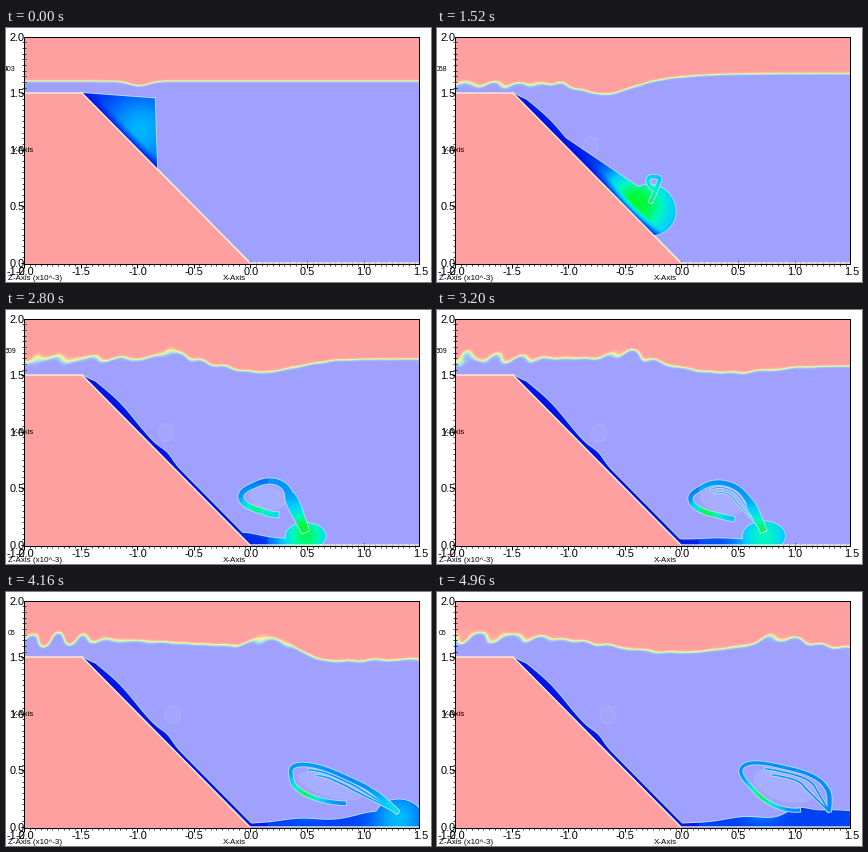
Write a matplotlib script that moves like this. It is 425 px wide and 254 px high and loops after 5000 ms.

```python
import numpy as np
import matplotlib.pyplot as plt
from matplotlib.animation import FuncAnimation
from matplotlib.colors import LinearSegmentedColormap
from matplotlib.patches import Ellipse, PathPatch, Polygon
from matplotlib.path import Path

W, H, FRAMES, STEP = 425, 254, 125, 40
LEFT, RIGHT, TOP, BOTTOM = 18, 413, 9, 236
FLOOR, UNIT = 235, 113.2
PINK, WATER, PALE = "#ffa0a0", "#a0a0ff", "#bcd8ff"
SLIDE_MAP = LinearSegmentedColormap.from_list(
    "slide", ["#0010e8", "#0070ff", "#00d0ff", "#00f8c0", "#00fa38"])
MIX_MAP = LinearSegmentedColormap.from_list(
    "mix", [PINK, "#ffc89c", "#fdf2a4", "#c4fab4", "#a4e4e8", WATER])
rng = np.random.default_rng(4)


def keyed(t, times, values):
    return float(np.interp(t, times, values))


def ramp(t, start, length):
    return float(np.clip((t - start) / length, 0, 1))


def bell(x, centre, width):
    return np.exp(-((x - centre) / width) ** 2)


def slope_y(x):
    return 65 + (x - 76) * 170 / 168


def on_slope(s, n):
    """Point s along the slope and n above it."""
    return np.column_stack([76 + .703 * s + .711 * n, 65 + .711 * s - .703 * n])


def turn(x, y, angle):
    c, s = np.cos(angle), np.sin(angle)
    return np.column_stack([x * c - y * s, x * s + y * c])


def ribbon(line, width):
    d = np.gradient(line, axis=0)
    d /= np.hypot(*d.T)[:, None] + 1e-6
    off = np.column_stack([-d[:, 1], d[:, 0]]) * np.reshape(width, (-1, 1)) / 2
    return np.vstack([line + off, (line - off)[::-1]])


def joined(polys):
    return Path.make_compound_path(
        *[Path(np.vstack([p, p[:1]]), closed=True) for p in polys])


# --- free surface ---------------------------------------------------------

def crest_x(t):
    return 110 + 12 * max(t - .6, 0) ** 2


def surface(x, t):
    left = keyed(t, [0, 1.5, 2.8, 4.2, 5], [53, 56, 48.5, 47, 43])
    right = keyed(t, [0, 1.6, 2.8, 3.6, 4.16, 5], [53, 45, 49, 63, 67, 54])
    crest = crest_x(t)
    step = 1 / (1 + np.exp(-(x - max(225, crest + 38))
                           / keyed(t, [1.5, 3.5], [26, 9])))
    trough = keyed(t, [0, .8, 1.5, 2.8, 3.6], [4.5, 12, 11, 13, 0])
    return (left + (right - left) * step
            + trough * bell(x, 133 + 15.5 * t * t, 14 + 13 * t)
            + 11 * bell(t, .8, .4) * bell(x, 97, 9)
            + 17 * ramp(t, 3.7, 1.25) * bell(x, 240, 95)
            - keyed(t, [1.2, 2.8, 3.6, 4.2, 5], [0, 8, 9, 8, 4]) * bell(x, crest, 17))


MODES = [(2 * np.pi / rng.uniform(11, 36), rng.uniform(-.22, .22),
          rng.uniform(-4, 4), rng.uniform(0, 6.3)) for _ in range(7)]
band_x, band_y = np.meshgrid(np.arange(LEFT, RIGHT) + .5, np.arange(TOP, 84) + .5)


def mixing(t):
    """Air to water, 0 to 1, stirred most on the shelf and at the crest."""
    depth = band_y - surface(band_x, t)
    rough = ramp(t, .6, 2.4) * (
        .2 + 1.7 * np.exp(-(band_x - 18) / 32) + .8 * bell(band_x, 62, 36)
        + .7 * bell(band_x, crest_x(t), 24)) * bell(depth, 0, 13)
    rough *= np.clip((150 + 75 * t - band_x) / 60, .05, 1)
    stir = sum(np.sin(k * band_x + q * band_y + w * t + p) for k, q, w, p in MODES)
    return 1 / (1 + np.exp(-(depth + 1.5 * rough * stir) / (.55 + .6 * rough)))


# --- slide ----------------------------------------------------------------

def head(t):
    x = 135 + 69 * (np.hypot(t, .45) - .45)
    times = [0, .8, 1.5, 2.8, 5]
    return (x, min(slope_y(x) - 22, 226),
            keyed(t, times, [2, 34, 26, 20, 26]), keyed(t, times, [2, 16, 25, 13, 22]))


def head_shape(t):
    x, y, rx, ry = head(t)
    a = np.linspace(0, 2 * np.pi, 50)
    lean = np.pi / 4 * (1 - ramp(t, 1.5, .8))
    return turn(rx * np.cos(a), ry * np.sin(a), lean) + [x, y]


def wedge(t):
    times = [0, .8, 1.52, 2.4]
    back = keyed(t, times, [0, 0, 40, 200])
    top = keyed(t, times, [55, 105, 160, 220])
    height = keyed(t, times, [48, 26, 24, 4])
    foot = keyed(t, times, [108, 140, 200, 240])
    return on_slope(np.array([back, top, foot]), np.array([0, height, -1]))


def tail(t):
    s = np.linspace(0, 246, 90)
    x = 76 + .703 * s
    thick = (3.2 + 4 * bell(x, 108, 24) + 2.6 * bell(x, 157, 8)) * np.clip(s / 14, 0, 1)
    thick *= np.clip((120 + 65 * t - x) / 18, 0, 1) * min(1, .35 + .45 * t)
    return np.vstack([on_slope(s, thick), on_slope(s[::-1], 0 * s - 2)])


def floor_sheet(t):
    x = np.linspace(232, max(head(t)[0], 240), 80)
    h = (3 + .075 * (x - 240) + 2.2 * np.sin(x / 14 - 1.5 * t) * np.clip((x - 250) / 60, 0, 1)
         + 11 * bell(x, 235, 25) * bell(t, 2.6, .5)
         + 8 * ramp(t, 4.1, .8) * bell(x, 360, 16))
    top = np.column_stack([x, FLOOR - h * ramp(t, 2, .5)])
    return np.vstack([top, [[x[-1], 242], [232, 242]]])


def plume_box(t):
    times = [1.1, 1.52, 2.8, 3.6, 4.16, 4.96]
    return (keyed(t, times, [180, 217, 262, 310, 324, 347]),
            keyed(t, times, [128, 154, 188, 195, 194, 194]),
            keyed(t, times, [1, 6, 25, 38, 45, 43]),
            keyed(t, times, [1, 6, 16, 17, 15, 20]))


def hook(t, scale, start):
    """Hook from its inner end over the top and down into the head."""
    cx, cy, a, b = plume_box(t)
    angle = np.radians(np.linspace(start, 330, 60))
    r = scale * (1 + .1 * np.sin(3 * angle + 2 * t))
    arc = turn(a * r * np.cos(angle), b * r * np.sin(angle), .3 * ramp(t, 2, 1.4))
    arc += [cx, cy]
    x, y, rx, ry = head(t)
    goal = np.array([min(x, 392), y - .3 * ry])
    u = np.linspace(0, 1, 25)[1:, None]
    bend = arc[-1] + .5 * (arc[-1] - arc[-6])
    leg = (1 - u) ** 2 * arc[-1] + 2 * u * (1 - u) * bend + u * u * goal
    return np.vstack([arc, leg])


gx, gy = np.meshgrid(np.arange(LEFT, RIGHT) + .5, np.arange(TOP, BOTTOM) + .5)
lift = np.clip((slope_y(gx) - gy) * .703, 0, None)


def heat(t):
    def spot(x, y, r):
        return np.exp(-((gx - x) ** 2 + (gy - y) ** 2) / (r * r))

    x, y, _, _ = head(t)
    front = keyed(t, [0, .8, 1.5, 2.8, 3.6, 5], [.4, .72, .52, .8, .45, .12])
    v = .03 + front * spot(x, y, keyed(t, [0, 1.5, 2.8], [42, 40, 26]))
    v += .62 * bell(t, 1.6, .5) * spot(x - 22, y - 10, 34)
    tip_x, tip_y = hook(t, 1, 60)[12]
    v += .6 * ramp(t, 1.7, .8) * spot(tip_x, tip_y, 17)
    v += .1 * ramp(t, 2.2, .6) * (gx > 262)
    return v * np.where(gx < 232, np.clip(.1 + lift / 9, 0, 1), 1)


# --- scene ----------------------------------------------------------------

fig = plt.figure(figsize=(W / 100, H / 100), dpi=100, facecolor="white")
ax = fig.add_axes([LEFT / W, 1 - BOTTOM / H, (RIGHT - LEFT) / W, (BOTTOM - TOP) / H])
ax.set_facecolor(WATER)


def px(n):
    return n * .72


def field(cmap, shape, bottom, z):
    return ax.imshow(np.zeros(shape), cmap=cmap, vmin=0, vmax=1, aspect="auto",
                     extent=(LEFT, RIGHT, bottom, TOP), interpolation="nearest", zorder=z)


def slide_layer(z):
    edge = ax.add_patch(PathPatch(Path([[0, 0]]), fc="none", ec=PALE, lw=px(1.8), zorder=z))
    return edge, field(SLIDE_MAP, gx.shape, BOTTOM, z + .1)


air = field(MIX_MAP, band_x.shape, 84, 1)
eddy = ax.add_patch(Ellipse((0, 0), 15, 18, fc="#a8a8ff", ec="#b0b4ff", lw=px(1), zorder=2))
haze = ax.add_patch(Ellipse((0, 0), 1, 1, fc="#acb4ff", ec="none", zorder=2))
body_layer, plume_layer = slide_layer(3), slide_layer(3.3)

ax.add_patch(Polygon([[10, 65], [76, 65], [245, 236], [245, 240], [10, 240]],
                     fc=PINK, ec="none", zorder=4))
ax.plot([10, 76, 244, 420], [65, 65, FLOOR, FLOOR], color="#fff6d2", lw=px(1.3), zorder=5)
ax.set_xlim(LEFT, RIGHT)
ax.set_ylim(BOTTOM, TOP)

ax.set_xticks(LEFT + UNIT * np.arange(7) / 2)
ax.set_xticks(LEFT + UNIT * np.arange(70) / 20, minor=True)
ax.set_yticks(FLOOR - UNIT * np.arange(4) / 2)
ax.set_yticks(FLOOR - UNIT * np.arange(40) / 20, minor=True)
ax.tick_params(which="major", direction="inout", length=px(7), width=px(1),
               labelbottom=False, labelleft=False)
ax.tick_params(which="minor", direction="inout", length=px(4), width=px(.7))
for side in ax.spines.values():
    side.set_linewidth(px(1))
    side.set_zorder(6)


def label(x, y, text, size, ha="center"):
    return fig.text(x / W, 1 - y / H, text, fontsize=px(size), ha=ha,
                    va="center_baseline", family="Liberation Sans", color="black")


for k in range(8):
    label(LEFT + UNIT * k / 2 + .5, 243, f"{k / 2 - 2:.1f}", 11)
for k in range(5):
    label(18.5, FLOOR - UNIT * k / 2, f"{k / 2:.1f}", 11, "right")
label(10, 243, "-1.0", 11)
label(6, 121, "Y-Axis", 8, "left")
label(2, 250, "Z-Axis (x10^-3)", 8, "left")
label(228, 250, "X-Axis", 8)
clock = label(10, 41, "", 7, "right")


def show_clock(t):
    count = round(keyed(t, [0, .8, 1.52, 2.8], [403, 1053, 2058, 3509]))
    clock.set_text(f"{count % 1000:03d}" if t < 3.4 else "05")


def show_eddies(t):
    eddy.set_center((146 + 5 * t, 123 - 31 * np.exp(-2.5 * max(t - .8, 0))))
    eddy.set_alpha(.7 * ramp(t, .4, .4))
    cx, cy, a, b = plume_box(t)
    haze.set_center((cx, cy))
    haze.set(width=1.5 * a, height=1.5 * b, angle=17 * ramp(t, 2, 1.4))
    haze.set_alpha(.7 * ramp(t, 1.2, .5))


def paint(layer, polys, values):
    edge, img = layer
    path = joined(polys)
    edge.set_path(path)
    img.set_data(values)
    img.set_clip_path(path, ax.transData)


def show_slide(t):
    v = heat(t)
    parts = [head_shape(t), tail(t)]
    if t < 2.4:
        parts.append(wedge(t))
    if t > 2:
        parts.append(floor_sheet(t))
    paint(body_layer, parts, v)
    for artist in plume_layer:
        artist.set_visible(t > 1.2)
    if t <= 1.2:
        return
    main = hook(t, 1, 60)
    end = np.linspace(0, 1, len(main))
    width = (keyed(t, [1.2, 1.52, 2.6, 3.6, 5], [0, 3.5, 5.5, 4, 3.2])
             * (1 + keyed(t, [1.5, 2.6, 3.6], [0, 1.6, .4]) * bell(end, .85, .15)))
    strips = [ribbon(main, width)]
    for scale in (.74, .48):
        if t > 3:
            strips.append(ribbon(hook(t, scale, 225), 1.5 * ramp(t, 3, .4)))
    paint(plume_layer, strips, v + .2 * ramp(t, 1.5, 1))


def draw(i):
    t = i * STEP / 1000
    show_clock(t)
    air.set_data(mixing(t))
    show_eddies(t)
    show_slide(t)
    return []


anim = FuncAnimation(fig, draw, frames=FRAMES, interval=STEP, init_func=lambda: [],
                     repeat=True, repeat_delay=0, blit=False)
plt.show()
```
